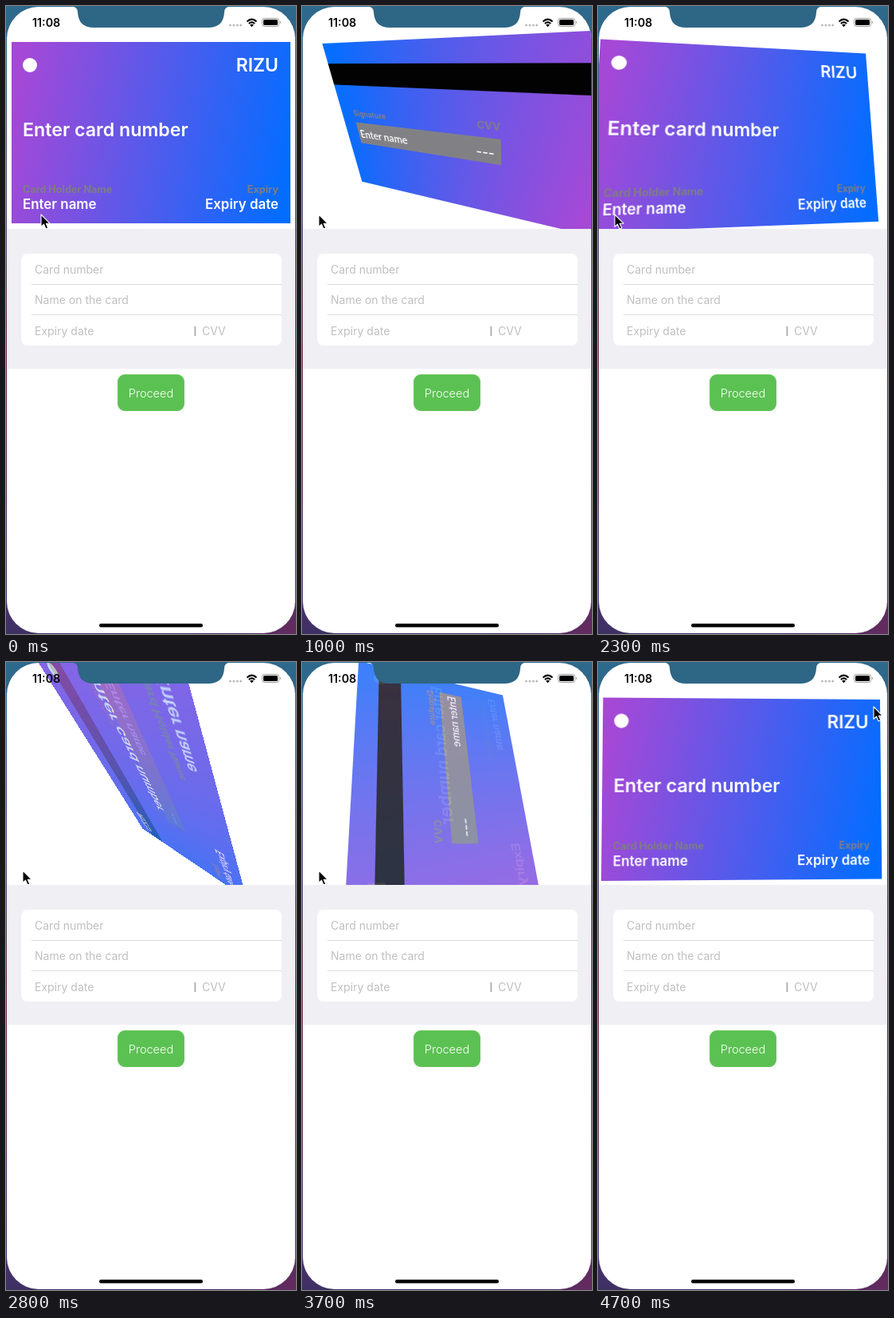
Recreate the animation shown at these times as an HTML page. Size 364 px wide and 786 px high, loop 4800 ms.

```html
<!DOCTYPE html>
<html lang="en">
<head>
<meta charset="utf-8">
<title>Card flip</title>
<style>
  html, body { margin: 0; width: 100%; height: 100%; overflow: hidden; }
  body {
    position: relative;
    background: radial-gradient(circle at 100% 100%, #632b60, transparent 140px),
      linear-gradient(#2d6a8c, #4b4a7c 30%, #6d2b50 55%, #482f68 96%, #3d3164);
  }
  svg { position: absolute; left: 0; top: 0; font-family: Inter, Roboto, sans-serif; }
  #phone { position: absolute; left: 1px; top: 1px; width: 362px; height: 784px; border-radius: 40px; overflow: hidden; background: #fff; }
  #card { left: 6px; top: 44px; }
  .white { fill: #fff; font-weight: 600; }
  .label { fill: #7f7d84; font-weight: 700; font-size: 12.6px; }
  .hint { fill: #bfbfc2; font-size: 14px; }
  .end { text-anchor: end; }
</style>
</head>
<body>
<div id="phone">
  <svg id="card" width="350" height="227">
    <defs>
      <linearGradient id="warm" gradientUnits="userSpaceOnUse" x1="0" y1="82" x2="350" y2="145">
        <stop stop-color="#a648d6"/><stop offset="1" stop-color="#036dff"/>
      </linearGradient>
      <linearGradient id="cool" gradientUnits="userSpaceOnUse" x1="0" y1="82" x2="350" y2="145">
        <stop stop-color="#036dff"/><stop offset="1" stop-color="#a648d6"/>
      </linearGradient>
    </defs>
    <g id="front">
      <rect width="350" height="227" fill="url(#warm)"/>
      <circle cx="23" cy="29" r="9" fill="#fff"/>
      <text class="white end" x="335" y="37" font-size="23">RIZU</text>
      <text class="white" x="14" y="118" font-size="23.2">Enter card number</text>
      <text class="label" x="14" y="189">Card Holder Name</text>
      <text class="label end" x="335" y="189">Expiry</text>
      <text class="white" x="14" y="209" font-size="16.9">Enter name</text>
      <text class="white end" x="335" y="209" font-size="16.9">Expiry date</text>
    </g>
    <g id="back">
      <rect width="350" height="227" fill="url(#cool)"/>
      <rect y="27" width="350" height="30"/>
      <text class="label" x="23" y="104">Signature</text>
      <text class="label end" x="244" y="103">CVV</text>
      <rect x="23" y="114" width="221" height="35" fill="#808084"/>
      <text class="white" x="26" y="139" font-size="17" font-family="Lato, sans-serif">Enter name</text>
      <text class="white end" x="236" y="140" font-size="17">---</text>
    </g>
  </svg>
</div>
<svg width="364" height="786">
  <!-- form -->
  <path fill="#efeff4" d="M1 279H363V454H1z"/>
  <rect x="19" y="310" width="327" height="115" rx="8" fill="#fff"/>
  <path stroke="#dcdcdf" d="M32 348.5H346M32 386.5H346"/>
  <text class="hint" x="36" y="335">Card number</text>
  <text class="hint" x="36" y="373">Name on the card</text>
  <text class="hint" x="36" y="412">Expiry date</text>
  <path stroke="#8e8e93" stroke-width="1.2" d="M237.3 401V413"/>
  <text class="hint" x="246" y="412">CVV</text>
  <rect x="140.5" y="461.5" width="83" height="45" rx="8.5" fill="#5bc152" stroke="#69c660"/>
  <text x="182" y="490" font-size="14.5" font-weight="300" fill="#fff" text-anchor="middle">Proceed</text>

  <!-- notch and status bar -->
  <path fill="#2e6686" d="M82 0Q90 1 90 8Q91 27 110 27H254Q273 27 274 8Q274 1 282 0z"/>
  <text x="33" y="26" font-size="14.3" font-weight="600">11:08</text>
  <path stroke="#bbb" stroke-width="3" stroke-linecap="round" stroke-dasharray="0 4.4" d="M281.5 24H296"/>
  <g fill="none" stroke="#000" stroke-width="2">
    <path d="M302.5 19.5Q308.5 13.8 314.5 19.5M304.8 22Q308.5 18.7 312.2 22"/>
    <path fill="#000" stroke="none" d="M306 23.6Q308.5 21.7 311 23.6L308.5 26.2z"/>
    <rect x="321.5" y="15.5" width="21" height="10" rx="3" stroke="#999" stroke-width="1"/>
  </g>
  <rect x="323" y="17" width="18" height="7" rx="1.6"/>
  <path fill="#999" d="M344 18.7Q346 20.5 344 22.3z"/>
  <rect x="117" y="773" width="130" height="4.6" rx="2.3"/>

  <path id="pointer" stroke="#fff" stroke-width="1.1" stroke-linejoin="round" d="M0 0V15.4L3.5 12.2L6.1 18L8.8 16.8L6.3 11.2H11z"/>
</svg>
<script>
const LOOP = 4800, STEP = 100, FADE = 600;
const $ = id => document.getElementById(id);
const [card, back, front, pointer] = ["card", "back", "front", "pointer"].map($);

// start time, spring frequency (rad/s), direction
const flips = [[437, 6.8, 1], [1597, 7.5, -1], [2638, 6.8, 1], [3472, 6.1, -1]];

// critically damped spring from 0 to 1
const spring = (ms, freq) => {
  const k = Math.max(0, ms) / 1000 * freq;
  return 1 - (1 + k) * Math.exp(-k);
};

const ease = (t, from, to) => {
  const k = Math.min(1, Math.max(0, (t - from) / (to - from)));
  return k * k * (3 - 2 * k);
};

// the two faces overlap a little more than a plain crossfade
const opacity = k => Math.max(0, k) ** 0.8;

function draw(t) {
  let turn = 0, shown = 0;
  for (const [start, freq, dir] of flips) {
    turn += dir * spring(t - start, freq);
    shown += dir * ease(t, start, start + FADE);
  }
  card.style.transform = `perspective(350px) rotate3d(1, 1, 0, ${360 * turn}deg)`;
  front.style.opacity = opacity(1 - shown);
  back.style.opacity = opacity(shown);

  const away = ease(t, 4200, 4600);
  const x = 44 - 23 * ease(t, 0, 400) + 325 * away;
  const y = 261 - 205 * away;
  pointer.setAttribute("transform", `translate(${x} ${y})`);
}

const begin = performance.now();
function tick() {
  const t = (performance.now() - begin) % LOOP;
  draw(Math.floor(t / STEP) * STEP);
  requestAnimationFrame(tick);
}
tick();
</script>
</body>
</html>
```
